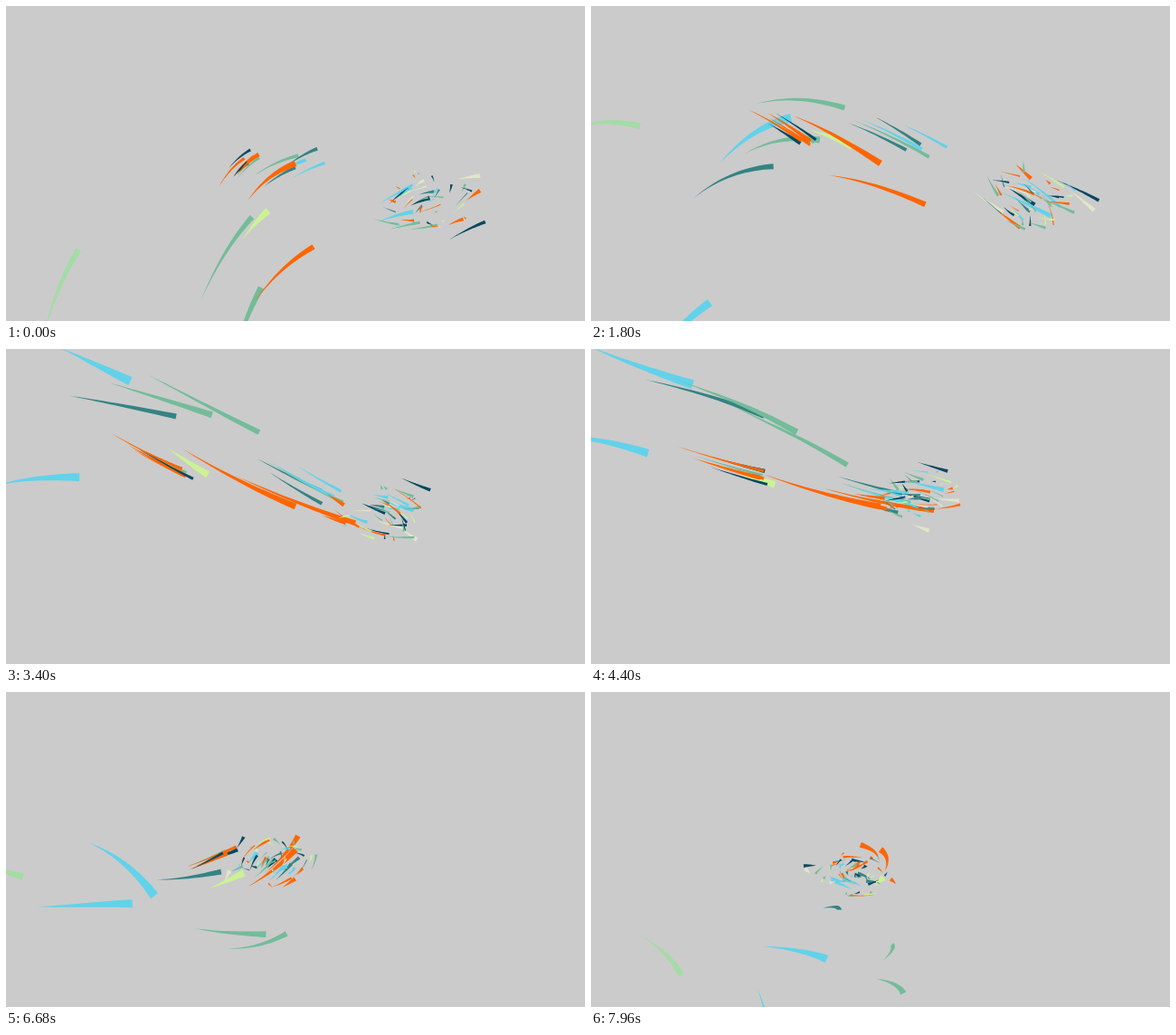
An HTML page with a canvas that plays this animation: 640 by 348 pixels, repeating every 8000 ms.

```html
<!DOCTYPE html>
<html lang="en">
<head>
<meta charset="utf-8">
<title>Ribbon swarm</title>
<style>
  html, body { margin: 0; height: 100%; overflow: hidden; background: #cbcbcb; }
  canvas { display: block; width: 100vw; height: 100vh; }
</style>
</head>
<body>
<canvas id="stage" width="640" height="348"></canvas>
<script>
const ctx = document.getElementById("stage").getContext("2d");
const LOOP = 8000, STEP = 40, LEG = 2000, TRAIL = 800;
const ORANGE = "#ff6600", TEAL = "#358383", GREEN = "#73bc9a", NAVY = "#064863",
      BLUE = "#62d2ea", MINT = "#a3dca5", LIME = "#ccf294", CREAM = "#e1e5c9";

// Smooth curve through waypoints that are one LEG apart; straight before the first.
function curve(values) {
  const last = values.length - 1;
  const slope = i => {
    const a = Math.max(0, i - 1), b = Math.min(last, i + 1);
    return (values[b] - values[a]) / (b - a);
  };
  return t => {
    const i = Math.max(0, Math.min(last - 1, Math.floor(t / LEG)));
    const u = t / LEG - i, v = 1 - u;
    if (u < 0) return values[0] + slope(0) * u;
    return v * v * (1 + 2 * u) * values[i] + u * u * (3 - 2 * u) * values[i + 1]
      + u * v * (v * slope(i) - u * slope(i + 1));
  };
}

function route(...points) {
  const x = curve(points.map(p => p[0])), y = curve(points.map(p => p[1]));
  return t => [x(t), y(t)];
}

let seed = 29;
function random(low = 0, high = 1) {
  seed = (seed * 16807) % 2147483647;
  return low + (high - low) * seed / 2147483647;
}

// The view rides along with one ribbon; this is its velocity in px per TRAIL.
const camera = route([62, -22], [108, 72], [130, 36], [64, -40], [-25, -17]);

const ribbons = [];
function add(color, width, at, trail = TRAIL) {
  ribbons.push({ color, width, at, trail });
}

// Ribbons that circle a moving center; speed is in radians per second.
function flock(center, { count, spread, width, speed, trail, colors }) {
  for (let i = 0; i < count; i++) {
    const radius = Math.pow(random(), 0.7), phase = random(0, Math.PI * 2);
    const spin = random(0.6, 1.2) * speed / 1000 / (0.4 + radius) * (i % 2 ? 1 : -1);
    add(colors[i % colors.length], random(...width), t => {
      const [x, y] = center(t), angle = phase + spin * t;
      const reach = radius * (1 - t / LOOP / 4);
      return [x + spread[0] * reach * Math.cos(angle), y + spread[1] * reach * Math.sin(angle)];
    }, random(...trail));
  }
}

const swarm = route([470, 213], [486, 217], [390, 170], [312, 178], [289, 203]);
const middle = route([335, 165], [375, 160], [352, 172], [315, 180], [285, 205]);
const left = route([275, 166], [238, 152], [190, 140], [225, 168], [298, 188]);

add(MINT, 7, route([80, 269], [48, 122], [-55, 70], [-15, 155], [102, 316]));
add(BLUE, 10, route([250, 375], [215, 105], [115, 33], [146, 137], [205, 440]));
add(BLUE, 9, route([110, 720], [130, 295], [66, 115], [92, 202], [264, 297]));
add(TEAL, 6, route([220, 385], [200, 160], [188, 65], [221, 172], [275, 242]));
add(GREEN, 7, route([282, 311], [250, 135], [225, 74], [262, 228], [347, 335]));
add(GREEN, 6, route([272, 233], [281, 105], [281, 107], [300, 248], [333, 280]));
add(LIME, 8, route([290, 226], [285, 150], [205, 143], [237, 193], [325, 205]), 400);
add(ORANGE, 6, route([340, 266], [372, 215], [385, 184], [337, 158], [297, 169]));

flock(left, {
  count: 6, spread: [24, 20], width: [3, 5], speed: 0.5, trail: [300, 600],
  colors: [ORANGE, NAVY, GREEN, ORANGE]
});
flock(middle, {
  count: 5, spread: [42, 26], width: [3, 4], speed: 0.5, trail: [250, 600],
  colors: [BLUE, TEAL, GREEN]
});
add(ORANGE, 7, () => [320, 174]);
flock(swarm, {
  count: 9, spread: [88, 46], width: [3, 5], speed: 0.9, trail: [200, 450],
  colors: [NAVY, BLUE, CREAM, ORANGE, GREEN]
});
flock(swarm, {
  count: 42, spread: [56, 38], width: [1, 3.4], speed: 3.2, trail: [80, 210],
  colors: [ORANGE, NAVY, GREEN, BLUE, TEAL, LIME, GREEN, ORANGE, CREAM]
});

// Follows a ribbon back through time and tapers it from head to tail.
function drawRibbon({ color, width, trail, at }, now) {
  const count = 18, dt = trail / count, points = [];
  let shiftX = 0, shiftY = 0;
  for (let i = 0; i <= count; i++) {
    const t = now - i * dt;
    const [x, y] = at(t), [vx, vy] = camera(t - dt / 2);
    points.push([x + shiftX, y + shiftY]);
    shiftX -= vx * dt / TRAIL;
    shiftY -= vy * dt / TRAIL;
  }
  const leftSide = [], rightSide = [];
  points.forEach(([x, y], i) => {
    const [ax, ay] = points[Math.max(0, i - 1)];
    const [bx, by] = points[Math.min(count, i + 1)];
    const length = Math.hypot(bx - ax, by - ay) || 1;
    const half = width / 2 * (1 - i / count);
    const nx = (ay - by) / length * half, ny = (bx - ax) / length * half;
    leftSide.push([x + nx, y + ny]);
    rightSide.unshift([x - nx, y - ny]);
  });
  ctx.fillStyle = color;
  ctx.beginPath();
  for (const [x, y] of [...leftSide, ...rightSide]) ctx.lineTo(x, y);
  ctx.fill();
}

function frame() {
  const now = Math.floor(performance.now() % LOOP / STEP) * STEP;
  ctx.fillStyle = "#cbcbcb";
  ctx.fillRect(0, 0, 640, 348);
  for (const ribbon of ribbons) drawRibbon(ribbon, now);
  requestAnimationFrame(frame);
}
frame();
</script>
</body>
</html>
```
